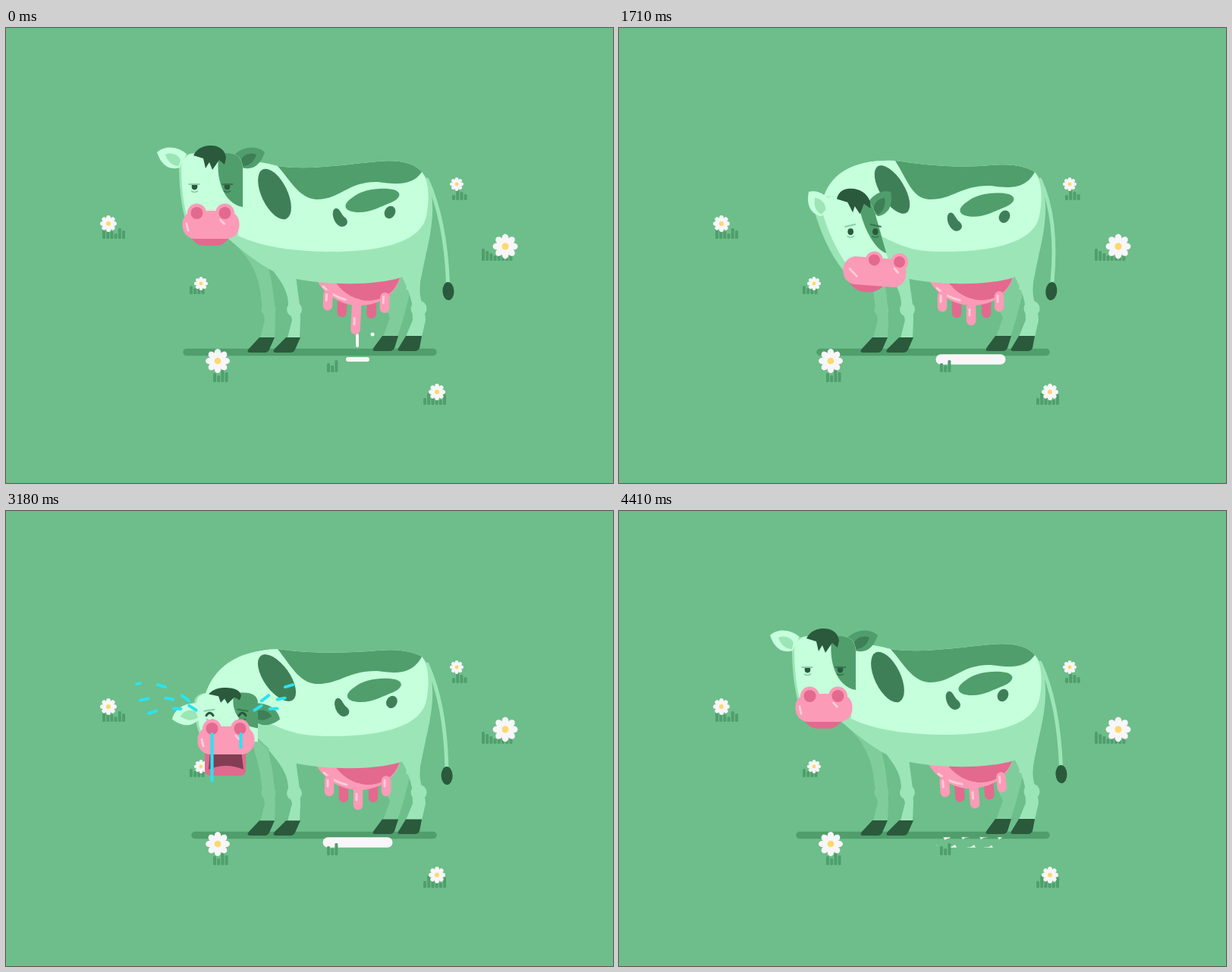
Recreate the animation shown at these times as an HTML page with a canvas. Size 800 px wide and 600 px high, loop 4.44 s.

```html
<!DOCTYPE html>
<html lang="en">
<head>
<meta charset="utf-8">
<title>Spilled milk</title>
<style>
html, body { margin: 0; width: 100%; height: 100%; overflow: hidden; background: #6dbe8a; }
canvas { display: block; }
</style>
</head>
<body>
<canvas id="stage" width="800" height="600"></canvas>
<script>
const ctx = document.getElementById('stage').getContext('2d');
const LOOP = 4440, TAU = Math.PI * 2;
const C = {
  bg: '#6dbe8a', light: '#c5ffdc', mid: '#9ce5b7', far: '#80cd9c', patch: '#509e6c', spot: '#3f7f57',
  dark: '#2a593c', pink: '#fb9bb7', rose: '#e3698f', shine: '#ffcbda', white: '#f8f6f8', tear: '#2be3f0', mouth: '#833d55'
};
const lerp = (a, b, f) => a + (b - a) * f;
const clamp = v => Math.max(0, Math.min(1, v));
const smooth = v => (v = clamp(v), v * v * (3 - 2 * v));
const bump = (t, from, to) => Math.sin(Math.PI * clamp((t - from) / (to - from))) ** 2;

// Poses: 0 stand, 1 glance back, 2 look down, 3 sniffle, 4 cry, 5 sigh, 6 stand again
let pose = 0;
const HOLDS = [[0, 340], [700, 800], [1080, 2020], [2350, 2740], [3060, 3440], [3760, 3920], [4270, LOOP]];
function poseAt(t) {
  const i = HOLDS.findIndex(hold => t <= hold[1]);
  return i ? i - 1 + smooth((t - HOLDS[i - 1][1]) / (HOLDS[i][0] - HOLDS[i - 1][1])) : 0;
}
// Blends one value or vector per pose; the last entry covers the remaining poses
function at(list) {
  const i = Math.floor(pose), f = pose - i;
  const pick = n => list[Math.min(n % 6, list.length - 1)];
  const a = pick(i), b = pick(i + 1);
  return Array.isArray(a) ? a.map((v, k) => lerp(v, b[k], f)) : lerp(a, b, f);
}

// Muzzle x, muzzle y, vertical squash, turn to the side, lean of the forehead
const HEAD = [[270, 258, 1, 0, 0], [301, 259, 1.05, 1, .05], [337, 320, 1.05, 1, .3],
  [290, 312, .85, 0, 0], [290, 301, .66, 0, 0], [290, 333, .85, 0, 0]];
// Withers, nape control, nape, throat, height of the rump
const NECK = [[358, 182, 325, 173, 300, 176, 292, 277, 176], [377, 180, 340, 166, 300, 162, 312, 277, 178],
  [364, 175, 283, 172, 268, 228, 330, 325, 181], [358, 180, 278, 183, 261, 245, 325, 292, 182]];

function fill(color, d) {
  ctx.fillStyle = color;
  ctx.fill(new Path2D(d));
}
function stroke(color, width, d) {
  ctx.strokeStyle = color;
  ctx.lineWidth = width;
  ctx.stroke(new Path2D(d));
}
function oval(color, x, y, rx, ry = rx, turn = 0) {
  ctx.fillStyle = color;
  ctx.beginPath();
  ctx.ellipse(x, y, rx, ry, turn, 0, TAU);
  ctx.fill();
}
function box(color, x, y, w, h, r) {
  ctx.fillStyle = color;
  ctx.beginPath();
  ctx.roundRect(x, y, w, h, r);
  ctx.fill();
}
function group(x, y, draw) {
  ctx.save();
  ctx.translate(x, y);
  draw();
  ctx.restore();
}

function grass(x, base, count) {
  for (let i = 0; i < count; i++) {
    const h = 7 + (i * 7 + x) % 10;
    box(C.patch, x + i * 5.2 - 2, base - h, 4, h, 1.5);
  }
}
function flower(x, y, r) {
  for (let i = 0; i < 8; i++) {
    const a = i * TAU / 8;
    oval(C.white, x + Math.cos(a) * r * .66, y + Math.sin(a) * r * .66, r * .34, r * .27, a);
  }
  oval(C.white, x, y, r * .5);
  oval('#fbd96b', x, y, r * .27);
}
function meadow() {
  grass(129, 278, 6);
  grass(244, 351, 4);
  grass(275, 467, 4);
  grass(425, 454, 3);
  grass(590, 227, 4);
  grass(629, 307, 8);
  grass(552, 497, 6);
  flower(135, 258, 11);
  flower(257, 337, 9);
  flower(279, 439, 16);
  flower(594, 206, 9);
  flower(658, 288, 16.5);
  flower(568, 480, 11);
}

function puddle(t) {
  const w = 31 + 61 * clamp(t / 1300), h = 6 + 7.5 * clamp(t / 1300);
  ctx.save();
  // Dry holes spread over the puddle at the end
  for (let i = 0; i < 12 && t > 3750; i++) {
    const grow = clamp((t - 3750 - i * 7 % 5 * 40) / 560) ** 1.4;
    const hole = new Path2D('M0 0H800V600H0Z');
    hole.ellipse(420 + i * 8, 434 + i * 2 % 3 * 3, 9 * grow, 6.5 * grow, 0, 0, TAU);
    ctx.clip(hole, 'evenodd');
  }
  box(C.white, 463.5 - w / 2, 437 - h / 2, w, h, h / 2);
  ctx.restore();
}
function drips(t, cycle, teatEnd) {
  if (t > 1360) return;
  const y = teatEnd + Math.max(0, cycle - .2) * 110;
  if (y < 432) stroke(C.white, 4, `M463 ${y}L463 ${Math.min(434, Math.max(416, y + 14))}`);
  const hop = t / 340 + .5, u = hop % 1, side = hop % 4 < 2 ? 1 : -1;
  oval(C.white, 463 + side * (10 + 20 * u), 434 - 120 * u * (1 - u), 2.5);
}

function hoof(x, y, w, slant) {
  fill(C.dark, `M${x} ${y}h${w}l${-slant} 16q-2 4 -6 4h-19q-6 0 -2 -5z`);
}
function tail(t) {
  const whip = bump(t, 540, 1200);
  const x = 576.5 - 6 * Math.cos((t - 3870) / 1110 * TAU) + whip * 42, y = 336 - whip * 50;
  const cx = 579, cy = 252, angle = Math.atan2(y - cy, x - cx);
  stroke(C.mid, 5, `M555 200Q${cx} ${cy} ${x} ${y}`);
  oval(C.dark, x + Math.cos(angle) * 11, y + Math.sin(angle) * 11, 12, 7.5, angle);
}
function udder(t, stretch) {
  const swing = 2.5 * Math.cos(t / 750 * TAU) * Math.exp(-t / 900) - 4.5 * smooth((t - 4150) / 250);
  const teat = (x, end, color) => {
    stroke(color, 12.5, `M${x} ${363 - Math.abs(x - 464) * .26}L${x} ${end - 6}`);
    if (color === C.pink) stroke(C.shine, 3, `M${x - 2} ${end - 13}L${x - 2} ${end - 21}`);
  };
  group(465, 320, () => {
    ctx.rotate(swing * Math.PI / 180);
    ctx.translate(-465, -320);
    teat(445, 382, C.rose);
    teat(484, 382, C.rose);
    fill(C.pink, 'M405 325C415 350 440 366 465 366C495 365 517 350 521 320Z');
    fill(C.rose, 'M428 325C440 350 462 359 478 359C500 358 517 345 520 322Z');
    stroke(C.shine, 3, 'M419 343C426 350 437 356 449 359');
    teat(426, 374, C.pink);
    teat(464, 392 + stretch, C.pink);
    teat(501, 374, C.pink);
  });
}

function ear(x, y, turn, side, outer, inner) {
  group(x, y, () => {
    ctx.scale(side, 1);
    ctx.rotate(turn * Math.PI / 180);
    fill(outer, 'M0 0C9 -9 26 -9 39 2L30 20C17 24 6 18 0 0Z');
    fill(inner, 'M11 3C20 -1 29 4 31 10L29 18C20 18 14 12 11 3Z');
  });
}
function eye(x, y, side, turn, soft) {
  const slope = at([0, 0, 3, -3, 2, 4]), brow = y - 3 - 5 * at([0, 1, 1, .6]);
  stroke(soft, 2, `M${x - 7 * side} ${brow + slope / 2}L${x + 6 * side} ${brow - slope / 2}`);
  stroke(soft, 1.6, `M${x - 4} ${y + 6}q4 3 8 0`);
  if (pose > 2.6 && pose < 5.6) return stroke(C.dark, 3, `M${x - 4.5} ${y + 1}q4.5 -7 9 0`);
  ctx.save();
  ctx.beginPath();
  ctx.rect(x - 9, y - 2 - 4 * turn, 18, 18);
  ctx.clip();
  oval(C.dark, x, y, 3.8, 4.4);
  ctx.restore();
}

function skull(squash, turn, lean) {
  const right = 42 - 20 * turn;
  const face = (left, chin) => `M${left} -72Q${left} -93 ${left + 22} -93L${right - 20} -93` +
    `Q${right} -93 ${right} -72L${right} 5L${chin} 5Q${left + 1} -22 ${left} -72Z`;
  ctx.save();
  ctx.transform(1, 0, lean, squash, 0, 0);
  fill(C.mid, face(-42 - 15 * turn, -30 - 8 * turn));
  fill(C.light, face(-39 - 8 * turn, -27));
  fill(C.patch, `M${11 - 5 * turn} -93C${5 - 7 * turn} -62 ${16 - 9 * turn} -26 ${right} -22` +
    `L${right} -72Q${right} -93 ${right - 20} -93Z`);
  ctx.restore();
}
function muzzle(t, squash, turn, lean) {
  const open = at([0, 0, 0, 0, 19, 7]), chew = 3 * (1 - turn) * clamp(squash * 8 - 7) * Math.sin(t / 370 * Math.PI) ** 2;
  const half = 37.5 + 4 * turn, nose = 15 * turn;
  ctx.save();
  ctx.rotate((12 - 25 * lean) * turn * Math.PI / 180);
  const round = Math.max(7, 20 - 90 * (1 - squash));
  box(C.rose, -28 - 8 * turn, 0, 54, 29 + open - chew, [0, 0, round, round]);
  if (open > 1) {
    const lip = 17 + 1.2 * open;
    fill(C.mouth, `M-21 15L20 15L23 ${lip}Q0 ${lip - open / 2} -23 ${lip}Z`);
  }
  const sides = [-18.5, 18.5].map(x => x * (1 - .1 * turn) + nose);
  for (const x of sides) oval(C.pink, x, -14, 12.5 - turn);
  box(C.pink, -half, -17, half * 2, 37, 17);
  for (const x of sides) {
    oval(C.rose, x, -14, 8 - turn / 2);
  }
  stroke(C.shine, 3, `M${-32 - turn} 0l${2 + 8 * turn} 9M${sides[1] - 6} -5l5 5`);
  ctx.restore();

  const streams = [62 * bump(t, 2560, 3750), 22 * bump(t, 2960, 3600)];
  streams.forEach((length, i) => {
    if (length > 1) stroke(C.tear, 4.2, `M${sides[i] + i} -7v${length}`);
  });
}
function head(t) {
  const [x, y, squash, turn, lean] = at(HEAD);
  const lift = 14 * bump(t, 4020, 4280) + 20 * bump(t, 440, 760);
  group(x, y - lift, () => {
    const earY = -94 * squash + 105 * (1 - squash), earTurn = 24 * turn - 105 * (1 - squash);
    ear(71 - 50 * turn, earY, earTurn, -1, C.patch, C.spot);
    skull(squash, turn, lean);
    ear(-71 + 14 * turn - 100 * lean, earY, earTurn, 1, C.light, C.mid);
    ctx.save();
    ctx.transform(1, 0, lean, squash, 0, 0);
    fill(C.dark, 'M-23 -90C-17 -101 -8 -103 0 -103C11 -103 19 -97 20 -87L18 -78L11 -84L2 -71L-2 -81L-7 -73L-10 -86Z');
    ctx.restore();
    const eyeX = 21.5 * (1 - .24 * turn), eyeY = -49 * squash;
    eye(-eyeX + lean * eyeY, eyeY, 1, turn, '#86d0a2');
    eye(eyeX + lean * eyeY, eyeY, -1, turn, '#387550');
    muzzle(t, squash, turn, lean);
  });
}

// Dashes flying along three arcs on both sides of the head
function tears(t) {
  const curve = (v, a, b, c) => (1 - v) ** 2 * a + 2 * v * (1 - v) * b + v * v * c;
  for (const side of [-1, 1]) for (let k = -1; k <= 1; k++) for (let n = 0; n < 4; n++) {
    const u = (t - 2800 - n * 140 - (k + 1) * 45 + (side > 0 && n === 0 ? 150 : 0)) / 400;
    if (u < .08 || u > 1) continue;
    const point = v => `${289 + side * curve(v, 27, 67, 117)} ${curve(v, 272, 235 + k * 13, 251 + k * 23)}`;
    stroke(C.tear, 4, `M${point(u)}L${point(Math.min(1, u + .11))}`);
  }
}

function torso() {
  const [bx, by, cx, cy, nx, ny, tx, ty, rump] = at(NECK);
  const back = `M${bx} ${by}C${bx + 42} ${by + 6} 445 ${rump + 4} 490 ${rump}C520 ${rump - 3} 540 ${rump + 3} 548 190`;
  const nape = `L${nx} ${ny}Q${cx} ${cy} ${bx} ${by}Z`;
  return {
    throat: `${tx} ${ty}`,
    sag: rump - 176,
    body: back + 'C562 205 565 235 560 265C556 295 546 320 545 345L527 345C530 335 528 325 520 329' +
      `C490 339 430 340 383 331C358 328 ${tx + 38} ${ty + 33} ${tx} ${ty}` + nape,
    coat: back + 'C557 200 559 225 554 248C546 287 480 295 430 295' +
      `C390 295 ${tx + 50} 291 ${tx + 14} 274` + nape,
    saddle: back + `C535 ${rump + 33} 512 ${rump + 30} 490 ${rump + 27}` +
      `C450 ${rump + 26} 440 227 408 226C386 224 ${bx + 16} 200 ${bx} ${by}Z`
  };
}
function cow(t, stretch) {
  const bob = at([0, 0, 0, 0, 2, 8]), { throat, sag, body, coat, saddle } = torso();
  const legs = draw => group(0, 428, () => {
    ctx.scale(1, 1 - bob / 110);
    ctx.translate(0, -428);
    draw();
  });
  legs(() => {
    fill(C.far, `M${throat}C318 298 334 320 337 362L341 385L335 409L354 409L355 385C354 360 352 340 345 312Z`);
    oval(C.far, 346, 371, 9.5);
    hoof(334, 408, 20, 7);
    fill(C.far, 'M516 320C516 345 505 352 499 365L506 382L497 407L516 407L523 385L536 335Z');
    oval(C.far, 512, 370, 11, 10);
    hoof(496, 406, 21, 5);
  });
  group(0, bob, () => {
    tail(t);
    udder(t, stretch);
    fill(C.mid, body);
  });
  legs(() => {
    fill(C.mid, 'M345 312C360 330 372 345 372 365L377 385L371 409L387 409L388 385C388 360 383 345 382 322Z');
    oval(C.mid, 380, 371, 10);
    hoof(369, 408, 19, 7);
    fill(C.mid, 'M517 320C528 338 533 352 535 364L536 385L527 407L548 407L553 385C553 370 543 360 546 335L553 300Z');
    oval(C.mid, 544, 370, 10.5);
    hoof(527, 406, 21, 3);
  });
  group(0, bob, () => {
    fill(C.light, coat);
    fill(C.patch, saddle);
    oval(C.spot, ...at([[354, 219, 17, 36, -.45], [365, 212, 16, 33, -.25], [360, 213, 16, 36, -.55], [357, 218, 17, 36, -.62]]));
    group(sag * .4, sag * 1.15, () => {
      fill(C.patch, 'M456 224C470 212 495 210 510 213C522 216 521 224 508 230C494 235 482 243 465 243C447 243 441 234 456 224Z');
      fill(C.spot, 'M434 238C440 236 441 246 447 250C453 256 449 262 442 262C432 260 427 241 434 238Z');
      oval(C.spot, 506, 243, 7, 8.5, .5);
    });
  });
  head(t);
  tears(t);
}

function draw(now) {
  const t = now % LOOP;
  pose = poseAt(t);
  const cycle = t / 340 % 1, stretch = t < 1360 ? 12 * (1 - cycle) ** 3 : 0;
  ctx.lineCap = 'round';
  ctx.fillStyle = C.bg;
  ctx.fillRect(0, 0, 800, 600);
  stroke(C.patch, 9.5, `M${at([238, 272, 265, 249])} 427.5L563 427.5`);
  puddle(t);
  meadow();
  drips(t, cycle, 393 + stretch);
  cow(t, stretch);
}

const start = performance.now();
function tick() {
  draw(performance.now() - start);
  requestAnimationFrame(tick);
}
tick();
</script>
</body>
</html>
```
